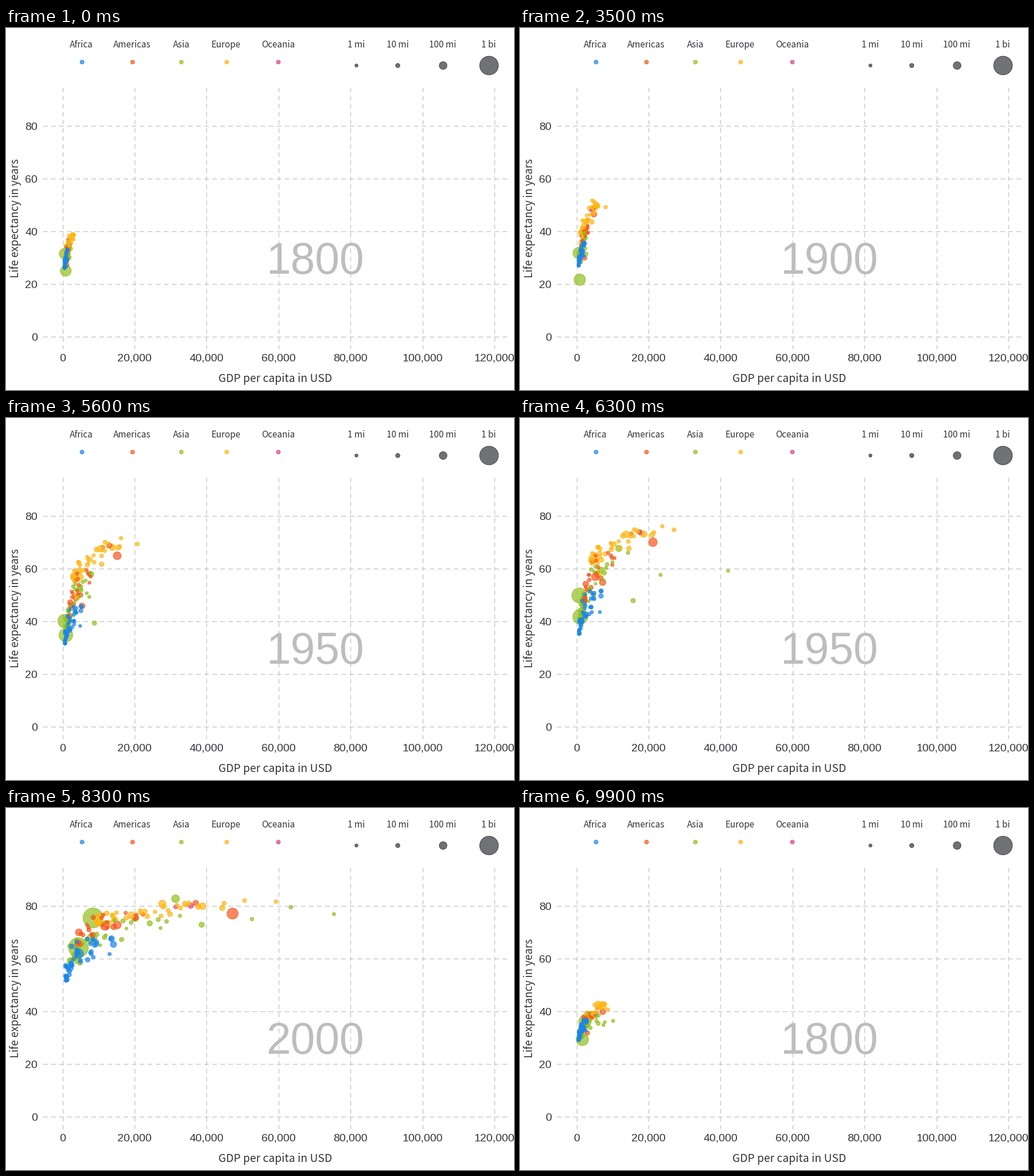
These frames come from a looping animation (885x632 px, 10000 ms). A matplotlib script:

```python
import numpy as np
import matplotlib.pyplot as plt
from matplotlib.animation import FuncAnimation
from matplotlib.colors import to_rgba

W, H, DPI = 885, 632, 100
PT = 72 / DPI
FRAMES = 100
X0, Y0 = 98.5, 539
PX_GDP, PX_LIFE = 6.271, 4.6          # pixels per 1,000 USD and per year
YEARS = np.array([1800, 1825, 1850, 1875, 1900, 1925, 1950, 1975, 2000, 2020])
STEPS = len(YEARS)
AGE = (YEARS - 1800) / 220
OIL = np.array([0, 0, 0, 0, 0, .01, .04, 1, .6, .4])
INK, GRID = "#33373b", "#c3c3c3"
COLORS = {"Africa": "#1a85ea", "Americas": "#f8551c", "Asia": "#90bf1e",
          "Europe": "#fdb614", "Oceania": "#dd3f8c"}

# Population: share of today's at the start, and how late it grew
GROWTH = {"Africa": (.06, 5.7), "Americas": (.02, 2.7), "Asia": (.19, 3.8),
          "Europe": (.26, 1.2), "Oceania": (.02, 2.7)}

# Ranges from the least to the most developed country of a region:
# first GDP, last GDP, lateness of growth, year of the health turn,
# first and last life expectancy
SPREAD = {
    "Africa": (44, (.5, 1.3), (.9, 17), (3.4, 3), (1996, 1962), (26, 33), (70, 76)),
    "Americas": (24, (.9, 2), (5, 27), (4, 3), (1968, 1936), (27, 36), (75, 81)),
    "Asia": (30, (.7, 2), (2.5, 44), (7, 5), (1982, 1945), (27, 35), (72, 82)),
    "Europe": (36, (.9, 3), (12, 54), (4, 3), (1938, 1913), (31, 38), (77, 83)),
    "Oceania": (2, (1.4, 1.6), (36, 46), (3, 2.8), (1912, 1910), (33, 34), (81, 82)),
}

rng = np.random.default_rng(7)


def country(region, pop, g0, g1, late, turn, l0, l1, span=28, oil=0):
    """Region, GDP, life expectancy and population at each year step."""
    gdp = g0 + (g1 - g0) * AGE ** late + oil * OIL
    life = l0 + (l1 - l0) / (1 + np.exp((turn - YEARS) / span))
    a, q = GROWTH[region]
    return region, gdp, life, pop * (a + (1 - a) * AGE ** q)


def sample(region):
    n, *ranges = SPREAD[region]
    for i in range(n):
        d = (i + .5) / n
        mix = np.clip(d + rng.normal(0, .16, 6), 0, 1)
        g0, g1, late, turn, l0, l1 = (
            lo + (hi - lo) * m for (lo, hi), m in zip(ranges, mix))
        lo, hi = ranges[1]
        g1 = lo * (hi / lo) ** mix[1]
        pop = min(10 * np.exp(rng.normal(0, 1.1)), 90)
        yield country(region, pop, g0, g1, late, turn, l0, l1)


india = country("Asia", 1380, .9, 7.9, 13, 1972, 25, 73, 22)
india[2][4] -= 9                      # famine around 1900

world = [
    india,
    country("Asia", 1411, .6, 18, 16, 1964, 31.5, 78, 14),
    country("Asia", 274, 1, 12.4, 8, 1966, 30, 74, 22),
    country("Asia", 220, .9, 5.2, 6, 1966, 27, 68, 24),
    country("Asia", 126, 1.2, 40, 4, 1943, 34, 85, 20),
    country("Asia", 5.9, 1.2, 90.7, 6, 1938, 31, 84),
    country("Asia", 2.8, 1.6, 19, 5, 1952, 31, 82, 24, oil=113),
    country("Asia", 4.3, 2, 40, 5, 1952, 30, 80, 24, oil=42),
    country("Asia", 35, 1.5, 43, 4, 1967, 31, 77, 16, oil=9),
    country("Americas", 330, 1.7, 57.5, 3.2, 1918, 35, 79),
    country("Americas", 212, 1, 14.6, 3.6, 1951, 31, 77, 24),
    country("Americas", 128, 1.3, 18.3, 3.2, 1952, 27, 77, 22),
    country("Americas", 38, 1.5, 44.5, 3, 1916, 36, 83),
    country("Europe", 84, 1.2, 25.6, 5, 1955, 34, 80, 20),
    country("Europe", 5.4, 1.5, 74, 3.6, 1906, 35, 83),
    country("Europe", 8.6, 2.2, 59, 2.5, 1916, 36, 84),
    country("Africa", 206, .7, 5.4, 3, 1974, 29, 70, 22),
]
for region in SPREAD:
    world += sample(region)
world.sort(key=lambda c: (c[0] == "Africa", -c[3][-1]))

places = np.array([np.column_stack([X0 + PX_GDP * g, Y0 - PX_LIFE * l])
                   for _, g, l, _ in world])
people = np.array([p for *_, p in world])
tints = [COLORS[c[0]] for c in world]

plt.rcParams["font.family"] = "Noto Sans CJK JP"
fig = plt.figure(figsize=(W / DPI, H / DPI), dpi=DPI, facecolor="white")
ax = fig.add_axes([0, 0, 1, 1])
ax.set_xlim(0, W)
ax.set_ylim(H, 0)
ax.axis("off")


def radius(pop):
    return 2.75 + .444 * np.sqrt(pop)


def areas(r):
    return ((2 * np.asarray(r) - 1) * PT) ** 2


def label(x, y, text, px, **kw):
    kw = {"ha": "center", "va": "baseline", "color": INK, **kw}
    return ax.text(x, y, text, fontsize=px * PT, **kw)


def number(x, y, text, px, **kw):
    return label(x, y, text, px, family="Liberation Sans", **kw)


def bubbles(xy, r, colors, z):
    x, y = np.transpose(xy)
    return ax.scatter(x, y, s=areas(r), zorder=z, linewidths=PT,
                      facecolors=[to_rgba(c, .7) for c in colors],
                      edgecolors=[to_rgba(c, .85) for c in colors])


def grid_line(xs, ys):
    ax.plot(xs, ys, color=GRID, lw=1.3 * PT, zorder=1,
            dashes=(6.2, 4.6), dash_capstyle="butt")


for gdp in range(0, 121, 20):
    x = X0 + gdp * PX_GDP
    grid_line([x, x], [104, 560])
    number(x, 582, f"{gdp * 1000:,}", 19.5)
for life in range(0, 81, 20):
    y = Y0 - life * PX_LIFE
    grid_line([64, 873], [y, y])
    number(55, y + 7, str(life), 19.5, ha="right")

label(469, 618, "GDP per capita in USD", 19.3)
label(22.5, 332, "Life expectancy in years", 18.8, rotation=90,
      rotation_mode="anchor")

for x, (name, color) in zip((131.5, 220, 305.3, 383.5, 474), COLORS.items()):
    label(x, 34.5, name, 15.3)
    bubbles([(x, 58.5)], [3.9], [color], 3)
for x, pop, name in ((610.3, 1, "1 mi"), (682.3, 10, "10 mi"),
                     (761, 100, "100 mi"), (841, 1000, "1 bi")):
    label(x, 34.5, name, 15.3)
    bubbles([(x, 64.5)], [radius(pop)], [INK], 3)

year = number(538, 429, "1800", 76.5, color="#bdbdbd", zorder=2)
dots = bubbles(places[:, 0], radius(people[:, 0]), tints, 4)


def draw(frame):
    step, part = divmod(frame * STEPS, FRAMES)
    t = part / FRAMES
    nxt = (step + 1) % STEPS
    dots.set_offsets(places[:, step] * (1 - t) + places[:, nxt] * t)
    pop = people[:, step] * (1 - t) + people[:, nxt] * t
    dots.set_sizes(areas(radius(pop)))
    year.set_text(str(YEARS[nxt if t >= .5 else step]))
    return dots, year


anim = FuncAnimation(fig, draw, frames=FRAMES, interval=100, repeat=True,
                     repeat_delay=0, blit=False)
plt.show()
```
